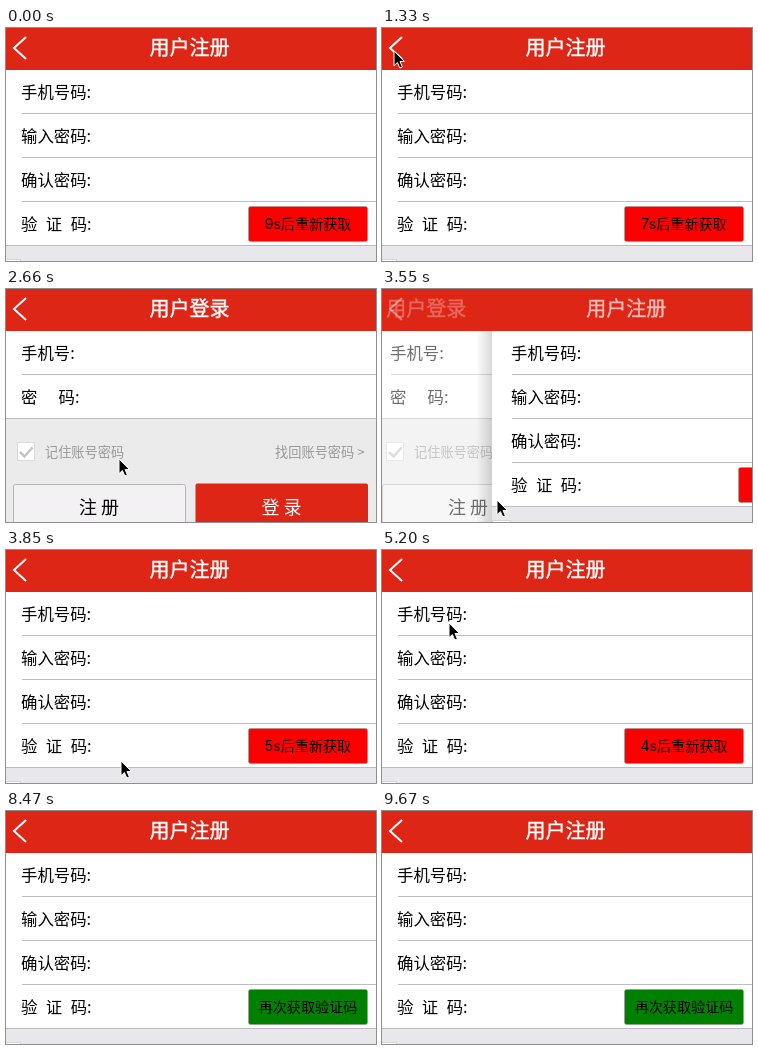
Animation, 370 px wide and 233 px high, one loop 9960 ms. Source, as an HTML page:

```html
<!DOCTYPE html>
<html lang="zh">
<head>
<meta charset="utf-8">
<style>
html, body { margin: 0; width: 100%; height: 100%; overflow: hidden; background: #fff; }
svg { display: block; width: 370px; height: 233px; }
text { font-family: "Noto Sans CJK SC", "Noto Sans CJK", "Noto Sans CJK JP", sans-serif; white-space: pre; }
.label { font-size: 16.4px; fill: #000; word-spacing: .55px; }
.title { font-size: 20px; fill: #fff; stroke: #fff; stroke-width: .4px; text-anchor: middle; }
.note { font-size: 13.2px; fill: #999; }
.code { font-family: Inter, "Noto Sans CJK SC", "Noto Sans CJK", sans-serif; font-size: 14.1px; text-anchor: middle; }
.big { font-size: 18px; text-anchor: middle; }
.line { stroke: #bcbbbd; fill: none; }
</style>
</head>
<body>
<svg viewBox="0 0 370 233">
  <defs>
    <linearGradient id="shade">
      <stop offset="0" stop-color="#000" stop-opacity="0"/>
      <stop offset="1" stop-color="#000" stop-opacity=".22"/>
    </linearGradient>
  </defs>
  <rect width="370" height="233" fill="#fff"/>

  <g id="login">
    <rect x="-15" y="42" width="400" height="87" fill="#fff"/>
    <rect x="-15" y="129" width="400" height="104" fill="#ebebeb"/>
    <path class="line" d="M16 85.5H385M-15 129.5H385"/>
    <text class="label" x="15" y="70">手机号:</text>
    <text class="label" x="15" y="114">密     码:</text>
    <rect x="11.5" y="153.5" width="17" height="18" fill="#fff" stroke="#d9d9d9"/>
    <path d="M14 163l4.5 4.5 8-9" fill="none" stroke="#c4c4c4" stroke-width="2.5"/>
    <text class="note" x="39" y="167.5">记住账号密码</text>
    <text class="note" x="358.500" y="167.5" text-anchor="end">找回账号密码 &gt;</text>
    <rect id="join" x="7.5" y="195.5" width="172" height="44" rx="2" stroke="#b5b5b5"/>
    <text class="big" x="93" y="224.5">注 册</text>
    <rect x="189.5" y="194.5" width="172.5" height="44" rx="2" fill="#dd2616"/>
    <text class="big" x="275.5" y="224.5" fill="#fff">登 录</text>
  </g>

  <g id="register">
    <rect id="edge" x="-20" y="42" width="16" height="191" fill="url(#shade)"/>
    <rect x="-4" y="42" width="380" height="175" fill="#fff"/>
    <rect x="-4" y="217" width="380" height="16" fill="#e8e7ec"/>
    <path class="line" d="M16 85.5H376M16 129.5H376M16 173.5H376M-4 217.5H376"/>
    <text class="label" x="15" y="70">手机号码:</text>
    <text class="label" x="15" y="114">输入密码:</text>
    <text class="label" x="15" y="158">确认密码:</text>
    <text class="label" x="15" y="202">验  证  码:</text>
    <rect id="send" x="242.5" y="178.5" width="119" height="35" rx="2" stroke="#999" stroke-opacity=".6"/>
    <text id="wait" class="code" x="302" y="201"></text>
    <rect x="-3.5" y="231.5" width="18" height="18" fill="#fff" stroke="#d5d5d5"/>
  </g>

  <rect width="370" height="42" fill="#dd2616"/>
  <path id="back" d="M20 9L8 20L20 31" fill="none" stroke="#fff" stroke-width="2"/>
  <text id="loginTitle" class="title" x="183.5" y="27">用户登录</text>
  <text id="registerTitle" class="title" x="183.5" y="27">用户注册</text>

  <path id="cursor" d="M0 0V14.7L3.400 11.500L5.800 17L8.400 15.900L6 10.500H10.500Z" fill="#000" stroke="#fff"/>
</svg>
<script>
const LOOP = 9960, WIDTH = 375;
const STEP = LOOP / 67, LEAD = 20;
const POP = 2173.8, PUSH = 3398.4;      // page transitions begin
const FIRST_TICK = 270, SECOND = 1018;  // countdown

const $ = id => document.getElementById(id);
const clamp = u => Math.min(1, Math.max(0, u));
const easeOut = u => 1 - (1 - u) ** 3;
const between = (t, a, b) => t >= a && t < b;

// Pointer moves: start, end, destination; it rests below the stage
const rest = [275, 250];
const moves = [
  [130, 872, 12, 23],
  [2360, 2656, 113, 170],
  [2660, 3100, 115, 211],
  [5040, 5180, 67, 73],
  [5185, 5480, 18, 31],
  [5930, 6965, 268, 211],
  [7120, 7410, 270, 234],
  [9350, 9490, 275, 218],
  [9500, 9640, ...rest]
];

function pointer(t) {
  let [x, y] = rest;
  for (const [start, end, toX, toY] of moves) {
    const u = easeOut(clamp((t - start) / (end - start)));
    x += (toX - x) * u;
    y += (toY - y) * u;
  }
  return [x, y];
}

// Critically damped slide
function slide(ms) {
  const w = Math.max(0, ms) * 0.0162;
  return w > 7 ? 1 : 1 - (1 + w) * Math.exp(-w);
}

const move = (id, x, y = 0) => $(id).setAttribute("transform", `translate(${x.toFixed(2)} ${y.toFixed(2)})`);
const fade = (id, a) => $(id).setAttribute("opacity", a.toFixed(3));
const fill = (id, color) => $(id).setAttribute("fill", color);

function draw(now) {
  const t = Math.floor((now % LOOP + LEAD) / STEP) * STEP - LEAD;

  // p: 0 = registration covers the stage, 1 = login is shown
  const p = slide(t - POP) - slide(t - PUSH);
  const sliding = p > 0.01 && p < 1;
  move("register", WIDTH * p);
  move("login", 10 * (p - 1));
  move("registerTitle", 200 * p);
  move("loginTitle", 200 * (p - 1));
  fade("login", 0.38 + 0.62 * p);
  fade("edge", 1 - p);
  fade("registerTitle", 1 - p);
  fade("loginTitle", p);
  fade("back", sliding || between(t, POP - 120, POP) ? 0.4 : 1);
  fill("join", between(t, PUSH - 150, PUSH + 2) ? "#d9d8d9" : "#f3f1f3");

  const left = Math.max(0, 8 - Math.floor((t - FIRST_TICK) / SECOND));
  $("wait").textContent = left ? left + "s后重新获取" : "再次获取验证码";
  fill("send", left ? "#ff0000" : "#008000");

  move("cursor", ...pointer(t));
}

function frame() {
  draw(performance.now());
  requestAnimationFrame(frame);
}
frame();
</script>
</body>
</html>
```
